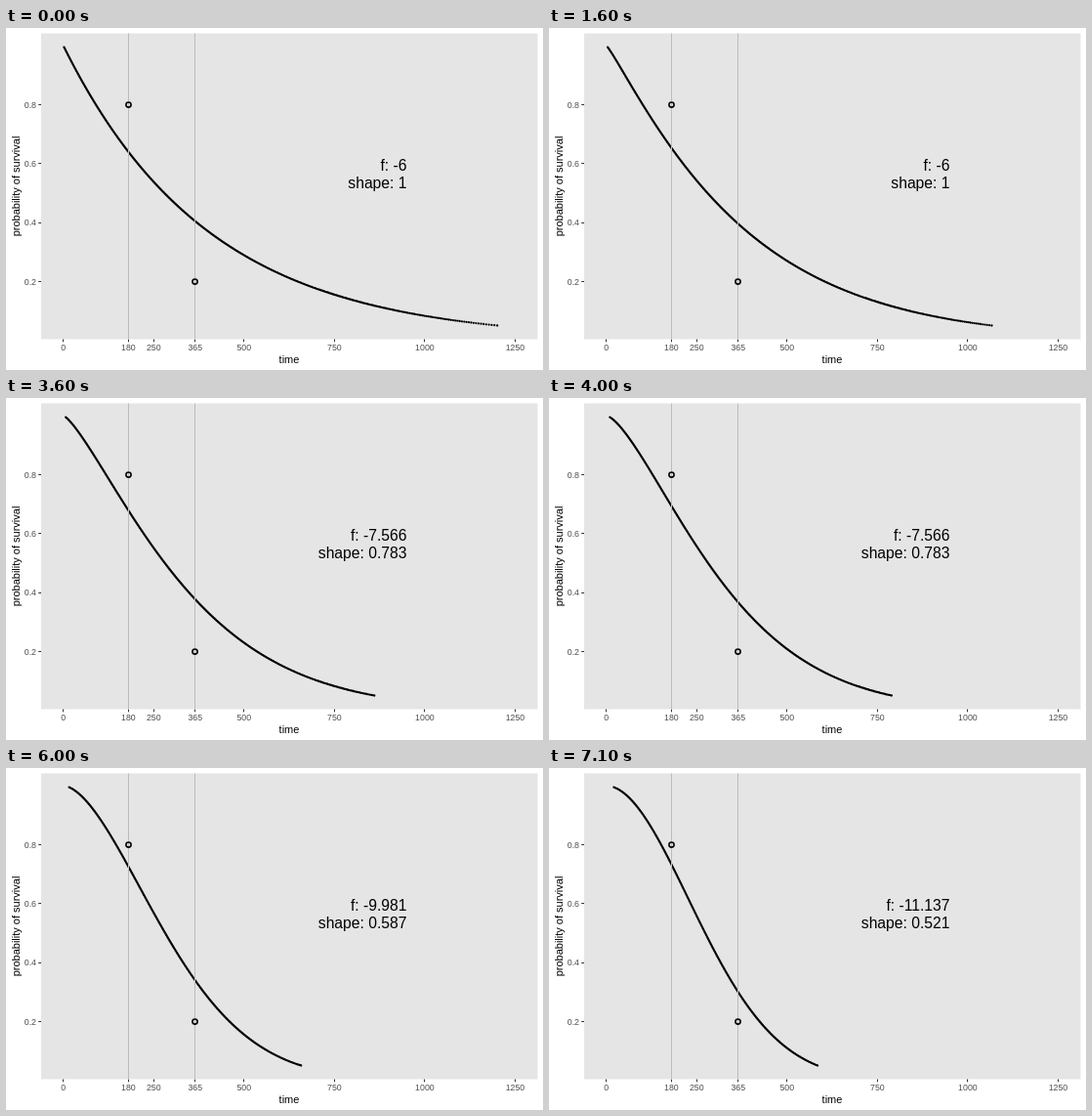
Recreate the animation shown at these times as an HTML page. Size 550 by 350 pixels, loop 8000 ms.

```html
<!DOCTYPE html>
<html lang="en">
<head>
<meta charset="utf-8">
<title>Survival curve</title>
<style>
  html, body { margin: 0; overflow: hidden; background: #fff; }
  svg { display: block; font: 11px "Liberation Sans", Arial, sans-serif; }
  #ticks { stroke: #333; stroke-width: 1; }
  #guides { stroke: #bcbcbc; stroke-width: 1; }
  #labels { font-size: 8.8px; fill: #4d4d4d; }
  #points { fill: none; stroke: #000; stroke-width: 1.6; }
  #curve { fill: none; stroke: #000; stroke-width: 2.3; stroke-linecap: round; }
  .note { font-size: 15.7px; text-anchor: end; }
</style>
</head>
<body>
<svg width="550" height="350" viewBox="0 0 550 350">
  <rect x="36" y="5.5" width="508.5" height="313" fill="#e5e5e5"/>
  <g id="ticks"></g>
  <g id="labels"></g>
  <text x="290" y="343" text-anchor="middle">time</text>
  <text transform="translate(14 162) rotate(-90)" text-anchor="middle">probability of survival</text>
  <path id="curve"/>
  <g id="guides"></g>
  <g id="points"></g>
  <text id="f" class="note" x="410.5" y="145.5"></text>
  <text id="shape" class="note" x="410.5" y="163.5"></text>
</svg>
<script>
const $ = id => document.getElementById(id);
const px = t => 58.7 + t * 0.3702;
const py = p => 18.2 + (1 - p) * 301.7;
const snap = v => Math.floor(v) + 0.5;

function add(parent, tag, attrs, text = '') {
  const el = document.createElementNS('http://www.w3.org/2000/svg', tag);
  for (const key in attrs) el.setAttribute(key, attrs[key]);
  el.textContent = text;
  $(parent).append(el);
}
const line = (parent, x1, y1, x2, y2) => add(parent, 'line', { x1, y1, x2, y2 });

for (const t of [0, 180, 250, 365, 500, 750, 1000, 1250]) {
  const x = snap(px(t));
  line('ticks', x, 318.5, x, 321.3);
  add('labels', 'text', { x: px(t), y: 330, 'text-anchor': 'middle' }, t);
}
for (const p of [0.2, 0.4, 0.6, 0.8]) {
  const y = snap(py(p));
  line('ticks', 33.2, y, 36, y);
  add('labels', 'text', { x: 31, y: py(p) + 3.2, 'text-anchor': 'end' }, p);
}
for (const [t, p] of [[180, 0.8], [365, 0.2]]) {
  const x = snap(px(t));
  line('guides', x, 5.5, x, 318.5);
  add('points', 'circle', { cx: x, cy: py(p), r: 2.6 });
}

// Weibull fits: intercept and shape
const fits = [[-6, 1], [-7.566, 0.783], [-9.981, 0.587], [-11.137, 0.521]];
const time = (p, [f, shape]) => Math.exp((Math.log(-Math.log(p)) - f) * shape);

const HOLD = 1200, STEP = 100, STEPS = 12, CYCLE = 2400, LOOP = 8000;
let shown;

function draw(now) {
  const ms = now % LOOP;
  const i = Math.floor(ms / CYCLE);
  const step = Math.max(0, Math.floor((ms % CYCLE - HOLD) / STEP) + 1);
  const key = i * 100 + step;
  if (key !== shown) {
    shown = key;
    const k = step / STEPS;
    const from = fits[i], to = fits[i + 1] || from;
    let d = '';
    for (let n = 995; n >= 51; n--) {
      const p = n / 1000;
      const t = time(p, from) * (1 - k) + time(p, to) * k;
      d += `M${px(t).toFixed(2)} ${py(p).toFixed(2)}h0`;
    }
    $('curve').setAttribute('d', d);
    const [f, shape] = k < 0.5 ? from : to;
    $('f').textContent = 'f: ' + f;
    $('shape').textContent = 'shape: ' + shape;
  }
  requestAnimationFrame(() => draw(performance.now() - start));
}
const start = performance.now();
draw(0);
</script>
</body>
</html>
```
